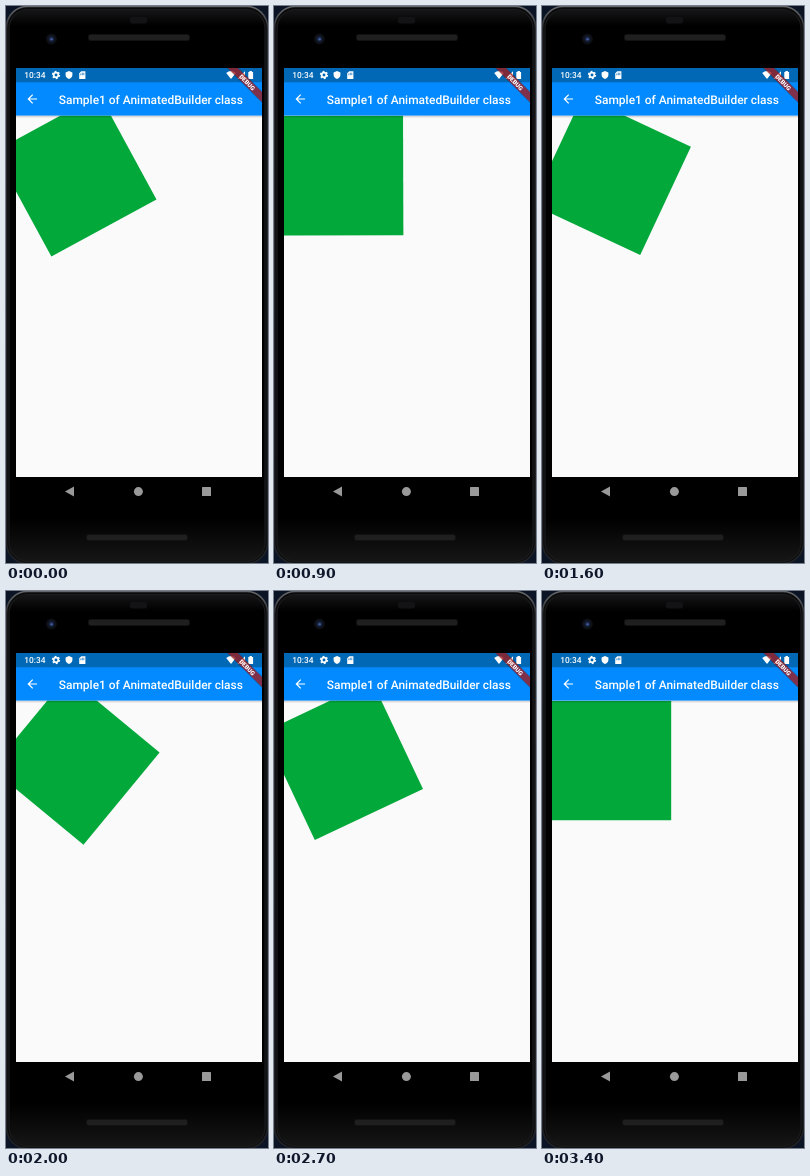
These frames come from a looping animation (262 px wide and 557 px high, 3.5 s). An HTML page:

```html
<!DOCTYPE html>
<html lang="en">
<head>
<meta charset="utf-8">
<title>Rotating square</title>
<style>
  html, body { margin: 0; width: 100%; height: 100%; overflow: hidden; background: #0b1424; }
  svg { display: block; width: 262px; height: 557px; }
  text { font-family: Roboto, "Noto Sans", sans-serif; fill: #fff; text-rendering: geometricPrecision; }
</style>
</head>
<body>
<svg viewBox="0 0 262 557">
  <defs>
    <clipPath id="screen"><rect x="10" y="62" width="246" height="438"/></clipPath>
    <clipPath id="page"><rect x="10" y="109.6" width="246" height="361.4"/></clipPath>
    <linearGradient id="shade" x2="0" y2="1">
      <stop stop-color="#000" stop-opacity=".2"/>
      <stop offset="1" stop-color="#000" stop-opacity="0"/>
    </linearGradient>
    <linearGradient id="rim" x2="0" y2="1">
      <stop stop-color="#66686c"/>
      <stop offset=".04" stop-color="#2c2d30"/>
      <stop offset="1" stop-color="#202124"/>
    </linearGradient>
    <linearGradient id="glass" x2="0" y2="1">
      <stop stop-color="#161618"/>
      <stop offset=".03" stop-color="#000"/>
      <stop offset=".92" stop-color="#000"/>
      <stop offset="1" stop-color="#161616"/>
    </linearGradient>
  </defs>

  <!-- phone body -->
  <rect x=".5" y=".5" width="261" height="557" rx="21" fill="#0a0a0b" stroke="url(#rim)" stroke-width="1.6"/>
  <rect x="3" y="3.5" width="256" height="552" rx="19" fill="url(#glass)" stroke="#1a1b1d" stroke-width="1.2"/>
  <rect x="124" y="11" width="17" height="6.5" rx="2" fill="#131316"/>
  <g fill="#1f1f20" stroke="#121212">
    <rect x="82.5" y="28.5" width="101" height="6" rx="2"/>
    <rect x="80.5" y="528.5" width="101" height="6" rx="2"/>
  </g>
  <circle cx="45.4" cy="33" r="5.4" fill="#0d1016"/>
  <circle cx="45.4" cy="33" r="2.9" fill="#18223c"/>
  <circle cx="45.6" cy="33.2" r="1.3" fill="#3d5a9c"/>

  <g clip-path="url(#screen)">
    <rect x="10" y="109" width="246" height="362" fill="#fafafa"/>
    <g clip-path="url(#page)">
      <rect id="square" x="9.6" y="109.7" width="119.6" height="119.6" fill="#02a83a"/>
    </g>
    <rect x="10" y="109.6" width="246" height="2.6" fill="url(#shade)"/>
    <rect x="10" y="76" width="246" height="33.6" fill="#048aff"/>
    <rect x="10" y="62" width="246" height="14.3" fill="#0068b4"/>

    <!-- status bar -->
    <text x="18.3" y="72.3" font-size="8.4" font-weight="500">10:34</text>
    <g fill="#fff">
      <circle cx="50" cy="69" r="2.3" fill="none" stroke="#fff" stroke-width="1.7"/>
      <circle cx="50" cy="69" r="3.6" fill="none" stroke="#fff" stroke-width="1.1" stroke-dasharray="1.9 1.87"/>
      <path d="M63 65l3.4 1.5v2.3q0 3-3.4 4.3-3.4-1.3-3.4-4.3v-2.3z"/>
      <path d="M75.3 65.2H79.4V73H73.2V67.3z"/>
      <path d="M74.8 67.5v1.7m1.5-2.5v2.5m1.5-2.5v2.5" stroke="#0068b4" stroke-width=".7"/>
      <path d="M225 73l-4.8-6q4.8-3.8 9.6 0z"/>
      <path d="M231.5 73L239 65.3V73z"/>
      <path d="M242.3 66h1.2v-.9h2.4v.9h1.2v7h-4.8z"/>
    </g>

    <!-- app bar -->
    <path transform="translate(19.1 85.8) scale(.598)" fill="#fff"
      d="M20 11H7.83l5.59-5.59L12 4l-8 8 8 8 1.41-1.41L7.83 13H20z"/>
    <text x="52.8" y="97.6" font-size="11.94" font-weight="500">Sample1 of AnimatedBuilder class</text>

    <!-- corner ribbon -->
    <g transform="translate(255.6 62) rotate(45) scale(.598)">
      <rect x="-41" y="27" width="82" height="14" fill="#000" opacity=".2"/>
      <rect x="-40" y="28" width="80" height="12" fill="#a81c22" opacity=".75"/>
      <text y="37.7" font-size="10.2" font-weight="900" text-anchor="middle">DEBUG</text>
    </g>

    <!-- navigation bar -->
    <rect x="10" y="471" width="246" height="29" fill="#000"/>
    <g fill="#999">
      <path d="M59 485.5L68 480.6V490.4z"/>
      <circle cx="132.4" cy="485.6" r="4.5"/>
      <rect x="196" y="481" width="9" height="9" rx=".6"/>
    </g>
  </g>
</svg>
<script>
  const LOOP = 3500, STEP = 100;
  const square = document.getElementById("square");

  // Steady turn, a half circle every five seconds, with a slower start.
  function angleAt(ms) {
    return ms < 400 ? 61.5 + 10.3 * ms / 400 : 71.8 + 0.03607 * (ms - 400);
  }

  function draw(now) {
    const ms = Math.floor(now % LOOP / STEP) * STEP;
    square.setAttribute("transform", `rotate(${angleAt(ms)} 69.4 169.5)`);
    requestAnimationFrame(draw);
  }
  draw(performance.now());
</script>
</body>
</html>
```
